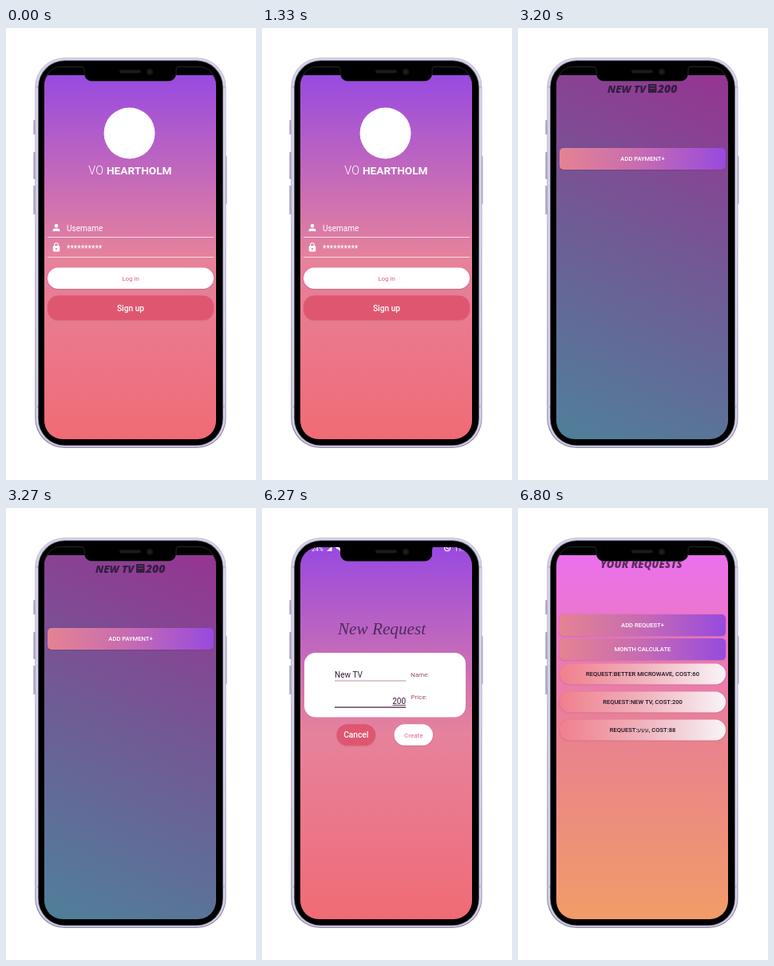
These frames come from a looping animation (313x565 px, 8 s). An HTML page with a canvas:

```html
<!DOCTYPE html>
<html lang="en">
<head>
<meta charset="utf-8">
<title>Phone app screens</title>
<style>
  html, body { margin: 0; width: 100%; height: 100%; overflow: hidden; background: #fff; }
  canvas { display: block; width: 313px; height: 565px; }
</style>
</head>
<body>
<canvas id="stage"></canvas>
<script>
const W = 313, H = 565, LOOP = 8000, SLIDE = 1600;
const canvas = document.getElementById('stage');
const ctx = canvas.getContext('2d');
const ratio = window.devicePixelRatio || 1;
canvas.width = W * ratio;
canvas.height = H * ratio;

const SCREEN = { x: 48, y: 49, w: 215, h: 465, r: 23 };
const BOTTOM = SCREEN.y + SCREEN.h, BAR = 59;
const PINK = '#df5670', SANS = 'Roboto, sans-serif';
const SUNSET = ['#984ae0', '#e6829c', '#f06b75'];
const CANDY = ['#eb70ee', '#e9828f', '#f19c68'];

function box(x, y, w, h, r, fill) {
  ctx.beginPath();
  ctx.roundRect(x, y, w, h, r);
  ctx.fillStyle = fill;
  ctx.fill();
}

function disc(x, y, r, fill) {
  ctx.beginPath();
  ctx.arc(x, y, r, 0, Math.PI * 2);
  ctx.fillStyle = fill;
  ctx.fill();
}

function poly(fill, ...pts) {
  ctx.beginPath();
  pts.forEach(([x, y]) => ctx.lineTo(x, y));
  ctx.closePath();
  ctx.fillStyle = fill;
  ctx.fill();
}

function text(str, x, y, { size = 10, weight = 400, color = '#fff', align = 'left', font = SANS } = {}) {
  ctx.font = `${weight} ${size}px ${font}`;
  ctx.textAlign = align;
  ctx.fillStyle = color;
  ctx.fillText(str, x, y);
}

function gradient(x0, y0, x1, y1, colors) {
  const g = ctx.createLinearGradient(x0, y0, x1, y1);
  colors.forEach((c, i) => g.addColorStop(i / (colors.length - 1), c));
  return g;
}

function rule(x, y, w, h, color) {
  ctx.fillStyle = color;
  ctx.fillRect(x, y, w, h);
}

const backdrop = (colors, top) =>
  rule(SCREEN.x, top, SCREEN.w, BOTTOM - top, gradient(0, top, 0, BOTTOM, colors));

const fieldLine = (y, h = 1) => rule(52, y, 208, h, 'rgba(255,255,255,.72)');

function button(x, y, w, h, r, fill, label, style) {
  ctx.save();
  ctx.shadowColor = 'rgba(90,30,50,.25)';
  ctx.shadowBlur = 2 * ratio;
  ctx.shadowOffsetY = 0.6 * ratio;
  box(x, y, w, h, r, fill);
  ctx.restore();
  const size = style.size || 10;
  text(label, x + w / 2, y + h / 2 + size * 0.38, { align: 'center', ...style });
}

const pale = (x, y, w, label) => button(x, y, w, 26.5, 13.5, '#fff', label, { size: 8, color: '#e0647c' });
const rosy = (x, y, w, h, label) => button(x, y, w, h, 13.5, PINK, label, { size: 10.2, weight: 500 });

function bar(y, label) {
  const fill = gradient(52, 0, 260, 0, ['#e58391', '#c56bb4', '#974ade']);
  button(52, y, 208, 27, 5, fill, label, { size: 7.6, weight: 500 });
}

function pill(y, label) {
  const fill = gradient(52, 0, 260, 0, ['#f17f8c', '#efb3bd', '#f8f4f8']);
  button(52, y, 208, 26, 13, fill, label,
    { size: 7.6, weight: 500, color: '#1d1220', font: 'Roboto, "DejaVu Sans", sans-serif' });
}

function person(x, y) {
  disc(x, y - 2.3, 2.3, '#fff');
  box(x - 4.6, y + 1.1, 9.2, 3.4, [4.6, 4.6, 0, 0], '#fff');
}

function lock(x, y) {
  ctx.strokeStyle = '#fff';
  ctx.lineWidth = 1.1;
  ctx.beginPath();
  ctx.arc(x, y - 2.9, 2.3, Math.PI, 0);
  ctx.lineTo(x + 2.3, y - 1);
  ctx.moveTo(x - 2.3, y - 2.9);
  ctx.lineTo(x - 2.3, y - 1);
  ctx.stroke();
  box(x - 4.2, y - 1.8, 8.4, 7.4, 1, '#fff');
  disc(x, y + 1.9, 1, '#d873a0');
}

const script = (str, x, y, size, color) =>
  text(str, x, y, { size, weight: 'italic 400', color, align: 'center', font: '"Liberation Serif", serif' });

const marker = (str, x, y, size, color) =>
  text(str, x, y, { size, weight: 'italic 800', color, font: '"Open Sans", sans-serif' });

function login() {
  backdrop(SUNSET, BAR);
  disc(154.5, 131.5, 32, '#fff');
  text('VO', 122, 183, { size: 14.5, weight: 300, align: 'right' });
  text('HEARTHOLM', 126, 183, { size: 13.6, weight: 700 });
  person(63, 249.5);
  text('Username', 76, 253.5);
  fieldLine(261);
  lock(63, 274);
  text('**********', 76, 278.5, { weight: 500 });
  fieldLine(286);
  pale(52, 299.5, 208, 'Log in');
  rosy(52, 334.5, 208, 30.5, 'Sign up');
}

function registration() {
  backdrop(SUNSET, SCREEN.y);
  text(':43', 58, 54, { size: 8 });
  box(77, 48, 6, 6, 1, '#fff');
  poly('#9a4cdd', [78, 53], [79.7, 50.8], [82, 53]);
  poly('#fff', [213, 49], [221.5, 49], [217, 54.3]);
  poly('#fff', [224, 54.3], [231, 48], [231, 54.3]);
  text('26%', 234.5, 54, { size: 8 });
  script('Registration', 156, 101, 29, '#43204f');
  person(63, 186);
  lock(63, 211);
  ['Email', 'Enter Password', 'Appartment Name', 'Name'].forEach((label, i) => {
    const y = 190 + i * 25.5;
    text(label, 76, y);
    fieldLine(Math.round(y + 7), i === 3 ? 2 : 1);
  });
  rule(76, 179.5, 1.3, 13, '#1a1020');
  pale(85, 309, 49, 'Confirm');
  rosy(168, 309, 49, 26.5, 'Cancle');
}

function payment() {
  const fill = gradient(263, BAR, 48, BOTTOM, ['#963492', '#6f5c95', '#4f809a']);
  rule(SCREEN.x, BAR, SCREEN.w, BOTTOM - BAR, fill);
  const ink = '#341d42';
  marker('NEW TV', 112, 81, 13, ink);
  box(163, 70, 10.5, 11, 1, ink);
  rule(165, 72, 6.5, 1, '#6b3a70');
  rule(165, 75, 6.5, 1, '#6b3a70');
  marker('200', 175, 81, 14, ink);
  bar(150, 'ADD PAYMENT+');
}

function request() {
  backdrop(SUNSET, SCREEN.y);
  text('24%', 62, 54, { size: 8 });
  poly('#fff', [81, 54], [87.5, 48], [87.5, 54]);
  poly('#fff', [90, 48], [98, 48], [98, 54]);
  ctx.strokeStyle = '#fff';
  ctx.lineWidth = 1.1;
  ctx.beginPath();
  ctx.arc(232, 50.3, 3.5, 0, Math.PI * 2);
  ctx.moveTo(230, 49);
  ctx.lineTo(234, 51.5);
  ctx.stroke();
  text('11:', 241, 54, { size: 8 });
  script('New Request', 150, 157.5, 21.2, '#4d2c5e');
  box(53, 181, 202, 80.5, 14, '#fff');
  const ink = '#3a1838', label = { size: 8, color: '#98506c' };
  text('New TV', 91, 211.5, { color: ink });
  rule(91, 215.5, 89, 1, '#c58a9c');
  text('Name:', 186, 210.7, label);
  text('200', 180, 245, { color: ink, align: 'right' });
  rule(163.5, 246, 16.5, 0.8, ink);
  rule(91, 248.5, 89, 1.2, ink);
  text('Price:', 186.5, 239.3, label);
  rosy(93.5, 270.3, 48.5, 26.5, 'Cancel');
  pale(165.5, 270.3, 48.5, 'Create');
}

function requests() {
  backdrop(CANDY, BAR);
  marker('YOUR REQUESTS', 103, 74.5, 13.2, '#5f2b60');
  bar(133, 'ADD REQUEST+');
  bar(163, 'MONTH CALCULATE');
  pill(194.5, 'REQUEST:BETTER MICROWAVE, COST:60');
  pill(229.5, 'REQUEST:NEW TV, COST:200');
  pill(264.5, 'REQUEST:עעע, COST:88');
}

function body() {
  const edge = '#aaa6c0';
  [[115, 18], [155, 34], [197, 36]].forEach(([y, h]) => box(34.3, y, 3.5, h, 1, edge));
  box(273.5, 160, 3, 60, 1, edge);
  box(36.3, 37, 239.2, 488, 37, gradient(0, 37, 0, 525, ['#c4c0d6', '#aeaac6', '#8f8ba8']));
  box(37.5, 38, 237, 485.8, 36, '#d8d4ea');
  [[37, 72], [37, 472], [271.5, 72], [271.5, 472]].forEach(([x, y]) => rule(x, y, 3.5, 3, '#c3bfd4'));
  box(40, 40.3, 232, 482, 33.5, '#77738b');
  box(40.8, 41, 230.4, 480.6, 33, '#000');
}

function notchPath() {
  ctx.beginPath();
  ctx.moveTo(95, 48.5);
  ctx.quadraticCurveTo(98, 48.5, 98, 52);
  ctx.arcTo(98, 66.5, 108, 66.5, 9);
  ctx.arcTo(213, 66.5, 213, 56, 9);
  ctx.lineTo(213, 52);
  ctx.quadraticCurveTo(213, 48.5, 216, 48.5);
}

function notch(outlined) {
  notchPath();
  ctx.fillStyle = '#000';
  ctx.fill();
  if (outlined) {
    ctx.strokeStyle = 'rgba(130,125,140,.5)';
    ctx.lineWidth = 0.6;
    ctx.stroke();
    ctx.beginPath();
    ctx.moveTo(48.3, 68);
    ctx.arcTo(48.3, 48.5, 70, 48.5, 21);
    ctx.lineTo(95, 48.5);
    ctx.moveTo(216, 48.5);
    ctx.lineTo(242, 48.5);
    ctx.arcTo(262.7, 48.5, 262.7, 68, 21);
    ctx.stroke();
  }
  box(142, 52.5, 27, 4, 2, '#1b1b20');
  disc(180, 54.8, 4, '#15151d');
  disc(180, 54.8, 1.7, '#20202f');
}

const SLIDES = [login, registration, payment, request, requests];

function draw() {
  const index = Math.floor(performance.now() % LOOP / SLIDE);
  ctx.setTransform(ratio, 0, 0, ratio, 0, 0);
  rule(0, 0, W, H, '#fff');
  body();
  ctx.save();
  ctx.beginPath();
  ctx.roundRect(SCREEN.x, SCREEN.y, SCREEN.w, SCREEN.h, SCREEN.r);
  ctx.clip();
  SLIDES[index]();
  ctx.restore();
  notch(index % 2 === 0);
  requestAnimationFrame(draw);
}
draw();
</script>
</body>
</html>
```
